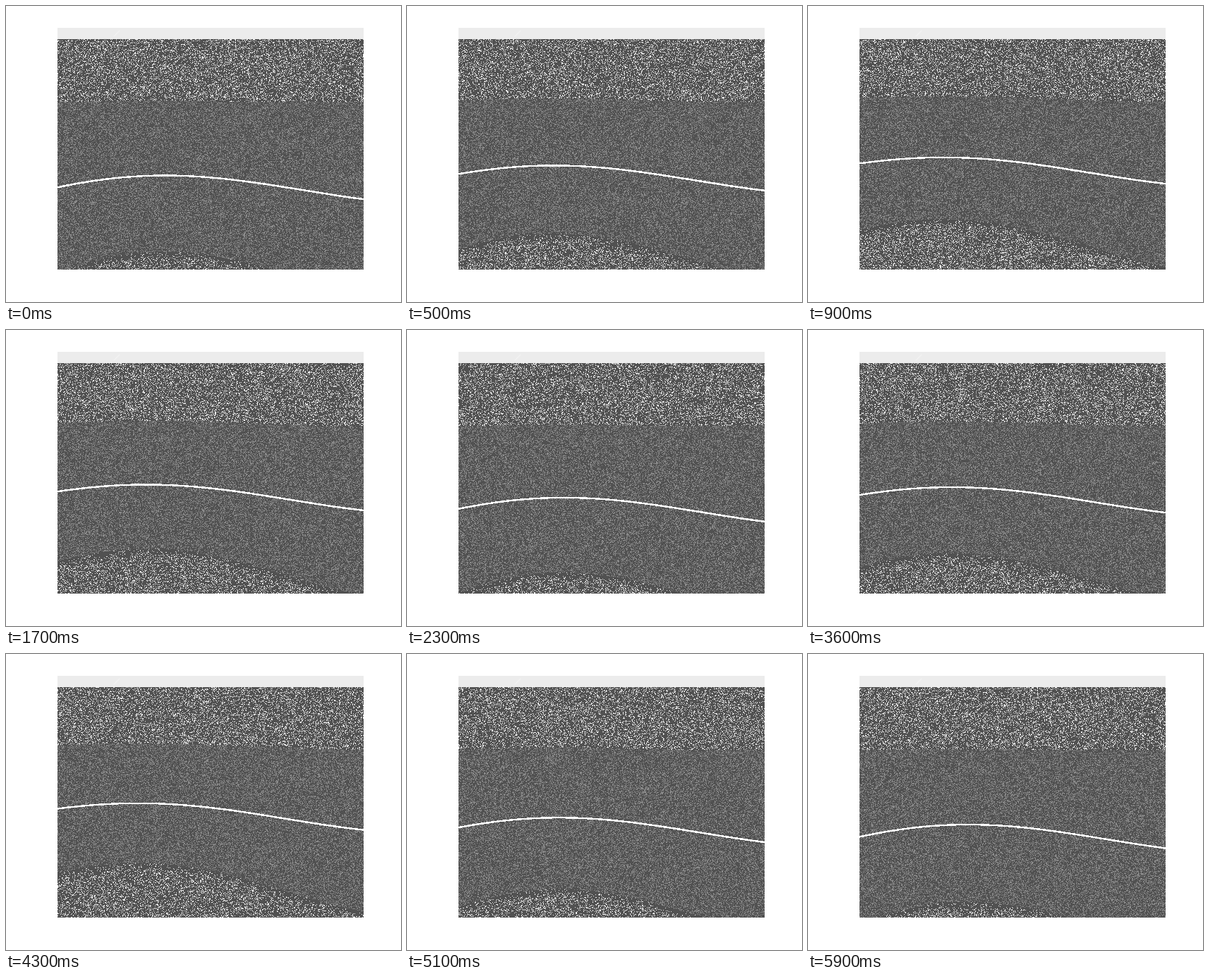
A matplotlib script that plays this animation: 560 px wide and 420 px high, repeating every 6 s.

```python
import numpy as np
import matplotlib.pyplot as plt
from matplotlib.animation import FuncAnimation

W, H, DPI = 560, 420, 100
LEFT, RIGHT, TOP, BOTTOM = 73, 507, 31, 374
STRIP = 16                      # height of the plain band at the top
FRAMES, PERIOD = 60, 30
DARK, MID, LIGHT = 82, 140, 236

plt.rcParams["toolbar"] = "None"
fig = plt.figure(figsize=(W / DPI, H / DPI), dpi=DPI, facecolor="white")
ax = fig.add_axes([0, 0, 1, 1])

x = np.arange(LEFT, RIGHT) + 0.5
u = (x - LEFT) / (RIGHT - LEFT)
rows = np.arange(TOP, BOTTOM)[:, None] + 0.5
shape = (BOTTOM - TOP, RIGHT - LEFT)


def displacement(phase):
    """Downward shift of the white line from its rest level, in pixels."""
    swing = np.cos(2 * np.pi * (phase - 27.1) / PERIOD)
    drop = (20.6 + 21 * swing) / 40
    crest = 21.5 * np.cos(2 * np.pi * (u - 0.264) / 1.9)
    return drop * (40 - 39 * u + 25 * u**2) - crest


def noise(seed):
    return np.random.default_rng(seed).random(shape)


def panel(phase):
    d = displacement(phase)
    top = np.minimum(132.5 + 0.25 * d, 136.5)
    low = 336 + 1.82 * d
    upper_grain = noise(100 + int(top.mean() * 3))
    lower_grain = noise(200 + phase)

    above, below = rows < top, rows > low
    # Bright specks thin out towards the lower boundary.
    bright = 0.2 * np.clip((rows - low) / 14 + 0.25, 0, 1)

    img = np.where(lower_grain < 0.3, MID, DARK)
    img = np.where(below, np.where(lower_grain < bright, LIGHT, DARK), img)
    img = np.where(above, np.where(upper_grain < 0.2, LIGHT, DARK), img)
    img[:STRIP] = LIGHT
    return img


image = ax.imshow(panel(0), cmap="gray", vmin=0, vmax=255, aspect="auto",
                  interpolation="nearest", extent=(LEFT, RIGHT, BOTTOM, TOP))
ax.set_xlim(0, W)
ax.set_ylim(H, 0)
ax.axis("off")
ax.plot([153, 161], [43, 35], color="#f4f4f4", lw=0.72)
wave, = ax.plot([], [], color="white", lw=1.0, antialiased=False,
                solid_capstyle="butt")


def draw(i):
    phase = i % PERIOD
    image.set_data(panel(phase))
    wave.set_data(x, 233.3 + displacement(phase))
    return image, wave


anim = FuncAnimation(fig, draw, frames=FRAMES, interval=100, repeat=True,
                     repeat_delay=0)
plt.show()
```
